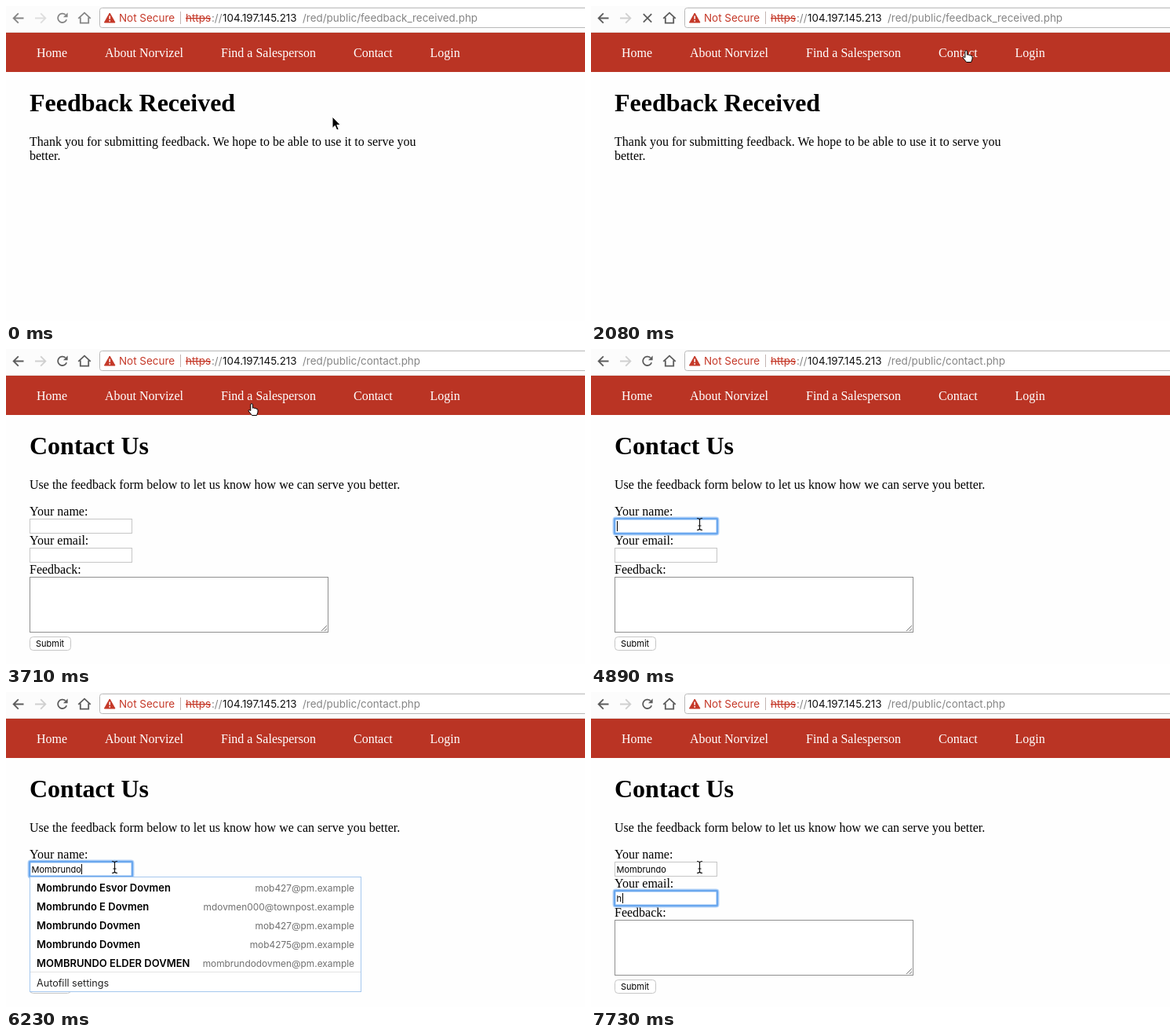
An HTML page that plays this animation: 738 by 401 pixels, repeating every 8 s.

```html
<!DOCTYPE html>
<html lang="en">
<head>
<meta charset="utf-8">
<title>Feedback form</title>
<style>
  html, body { margin: 0; width: 100%; height: 100%; overflow: hidden; background: #fefefe; }
  svg { display: block; }
  text { white-space: pre; font: 16px "Liberation Serif", serif; }
  .h1 { font-size: 32px; font-weight: bold; }
  .nav text { fill: #fff; }
  .bar text { font: 13.45px Inter, sans-serif; fill: #858585; }
  .bar .red { fill: #c53929; }
  .bar .host { fill: #111; }
  .strike { text-decoration: line-through; }
  .icon { fill: none; stroke-width: 1.8; }
  .ui { font: 11px Inter, sans-serif; }
  .name { font: 600 13px Inter, sans-serif; }
  .mail { font: 11.9px Inter, sans-serif; fill: #707070; text-anchor: end; }
  .more { font: 12.6px Inter, sans-serif; fill: #222; }
  .box { fill: #fff; stroke: #c6c6c6; }
  .glow { fill: none; stroke: #6ba8ee; stroke-width: 2.4; }
  .halo { fill: none; stroke: #b9d6f8; stroke-width: 4; }
</style>
</head>
<body>
<svg width="738" height="401" viewBox="0 0 738 401">
  <rect width="738" height="401" fill="#fefefe"/>

  <g class="bar">
    <rect width="738" height="33" fill="#fcfcfc"/>
    <path d="M0 33.5H738" stroke="#e6e2e1"/>
    <g id="icons" class="icon">
      <path d="M22.5 15.5H10M15.8 9.3L9.6 15.5L15.8 21.7"/>
      <path id="forward" d="M37 15.5H50M44.2 9.3L50.4 15.5L44.2 21.7"/>
      <g id="reload">
        <path d="M77.2 17.2A5.7 5.7 0 1 1 75.8 11.2"/>
        <path d="M78.6 8.6V14.2H73z" fill="currentColor" stroke="none"/>
      </g>
      <path id="stop" d="M66.8 10.2L77.2 20.6M77.2 10.2L66.8 20.6"/>
      <path d="M92.2 15.8L100 8.6L107.8 15.8M94.8 14.5V21.6H105.2V14.5"/>
    </g>
    <rect x="119.5" y="2.5" width="640" height="25" rx="3" fill="#fff" stroke="#b9b9b9"/>
    <path d="M132.2 9L139 21H125.400z" fill="#c53929" stroke="#c53929" stroke-linejoin="round"/>
    <path d="M132.200 12.500V16.800M132.200 18.100V19.700" stroke="#fff" stroke-width="1.500"/>
    <text class="red" x="144" y="20">Not Secure</text>
    <path d="M222.500 7V23" stroke="#c4b4b2"/>
    <text class="red strike" x="229" y="20">https</text>
    <text x="262" y="20">://</text>
    <text class="host" x="276" y="20">104.197.145.213</text>
    <text id="path" x="378" y="20"></text>
  </g>

  <g class="nav">
    <rect y="34" width="738" height="50" fill="#ba3424"/>
    <text x="39" y="65">Home</text>
    <text x="126" y="65">About Norvizel</text>
    <text x="274" y="65">Find a Salesperson</text>
    <text x="443" y="65">Contact</text>
    <text x="540.500" y="65">Login</text>
  </g>

  <g id="thanks">
    <text class="h1" x="30" y="134">Feedback Received</text>
    <text x="30" y="178">Thank you for submitting feedback. We hope to be able to use it to serve you</text>
    <text x="30" y="196">better.</text>
  </g>

  <g id="contact">
    <text class="h1" x="30" y="134">Contact Us</text>
    <text x="30" y="178">Use the feedback form below to let us know how we can serve you better.</text>
    <text x="30" y="212">Your name:</text>
    <text x="30" y="249">Your email:</text>
    <text x="30" y="286">Feedback:</text>
    <rect class="box" x="30.500" y="216.500" width="130" height="18"/>
    <rect class="box" x="30.500" y="253.500" width="130" height="18"/>
    <rect x="30.500" y="290.500" width="380" height="70" fill="#fff" stroke="#8f8f8f"/>
    <path d="M402 359L409 352M406 359L409 356" stroke="#777"/>
    <rect class="box" x="30.500" y="366.500" width="52" height="17" rx="4"/>
    <text class="ui" x="38" y="379">Submit</text>
    <g id="focus">
      <rect class="halo" x="29.500" y="215.500" width="132" height="20" rx="2"/>
      <rect class="glow" x="30" y="216" width="131" height="19" rx="1"/>
    </g>
    <text id="name" class="ui" x="32.500" y="230"></text>
    <text id="email" class="ui" x="32.500" y="267"></text>
    <path id="caret" d="M0 219V232" stroke="#000"/>
    <g id="menu">
      <rect x="30.500" y="235.500" width="422" height="146" fill="#fff" stroke="#a5c7ee"/>
      <path d="M31 356.500H452" stroke="#e4e4e4"/>
      <text class="more" x="39" y="375">Autofill settings</text>
    </g>
  </g>

  <g id="cursor" stroke-linejoin="round">
    <path id="arrow" d="M0 0V14.500L3.300 11.400L5.700 17L8.200 16L5.800 10.500H10.300z" stroke="#fff"/>
    <path id="hand" fill="#fff" stroke="#000" d="M3.800 9.500V1.900A1.300 1.300 0 0 1 6.400 1.900V6.200Q8 5.200 8.800 6.500Q10.300 5.800 11 7.200Q13 6.900 13 8.700V11.300L11.600 15.500H5.600L1 10Q.8 7.600 3.800 9.500z"/>
    <path id="beam" fill="none" stroke="#111" stroke-width="1.200" d="M-3 -7.500Q0 -7.500 .5 -6Q1 -7.500 4 -7.500M.5 -6V6M-3 7.500Q0 7.500 .5 6Q1 7.500 4 7.500M-1.500 2H2.500"/>
  </g>
</svg>
<script>
const LOOP = 8000;
const $ = id => document.getElementById(id);
const show = (id, on) => $(id).style.display = on ? "" : "none";
const latest = (steps, t) => steps.findLast(step => step[0] <= t);

const FULL_NAME = "Mombrundo";
const suggestions = [
  ["Mombrundo Esvor Dovmen", "mob427@pm.example"],
  ["Mombrundo E Dovmen", "mdovmen000@townpost.example"],
  ["Mombrundo Dovmen", "mob427@pm.example"],
  ["Mombrundo Dovmen", "mob4275@pm.example"],
  ["MOMBRUNDO ELDER DOVMEN", "mombrundodovmen@pm.example"]
];
$("menu").innerHTML += suggestions.map(([name, mail], i) => {
  const y = 254 + 24 * i;
  return `<text class="name" x="39" y="${y}">${name}</text><text class="mail" x="444" y="${y}">${mail}</text>`;
}).join("");

// time, x, y, shape
const pointer = [
  [0, 416, 141, "arrow"], [1050, 424, 124, "arrow"], [1200, 447, 92, "arrow"],
  [1350, 468, 64, "hand"], [1490, 475, 56, "hand"], [1780, 473, 56, "hand"],
  [2980, 464, 60, "hand"], [3130, 441, 66, "hand"], [3270, 405, 70, "arrow"],
  [3420, 365, 72, "hand"], [3570, 330, 71, "hand"], [3710, 308, 69, "hand"],
  [3860, 304, 78, "hand"], [4010, 303, 86, "arrow"], [4460, 270, 118, "arrow"],
  [4600, 195, 180, "arrow"], [4750, 145, 216, "beam"], [4890, 138, 223, "beam"]
];
// time, letters typed
const typing = [[0, 0], [5490, 1], [5640, 2], [5790, 4], [5930, 5], [6080, 7], [6230, 9]];

function draw(t) {
  const onForm = t >= 2380, onEmail = t >= 6530, loading = t >= 1930 && t < 2980;
  const active = t >= 1050;

  $("icons").style.stroke = $("icons").style.color = active ? "#5c5c5c" : "#858585";
  $("forward").style.stroke = active ? "#d0d0d0" : "#dedede";
  show("stop", loading);
  show("reload", !loading);
  $("path").textContent = "/red/public/" + (onForm ? "contact.php" : "feedback_received.php");
  show("thanks", !onForm);
  show("contact", onForm);

  $("name").textContent = FULL_NAME.slice(0, latest(typing, t)[1]);
  $("email").textContent = t >= 7730 ? "h" : "";
  show("menu", t >= 5490 && !onEmail);

  const focused = t >= 4890, row = onEmail ? 37 : 0;
  show("focus", focused);
  $("focus").setAttribute("transform", `translate(0 ${row})`);
  show("caret", focused && !(t >= 6980 && t < 7430));
  const typed = $(onEmail ? "email" : "name");
  const width = typed.textContent ? typed.getComputedTextLength() : 0;
  $("caret").setAttribute("transform", `translate(${Math.round(33 + width) + .5} ${row})`);

  const [, x, y, shape] = latest(pointer, t);
  $("cursor").setAttribute("transform", `translate(${x} ${y})`);
  for (const id of ["arrow", "hand", "beam"]) show(id, id === shape);
}

const start = performance.now();
function tick() {
  draw((performance.now() - start) % LOOP);
  requestAnimationFrame(tick);
}
tick();
</script>
</body>
</html>
```
